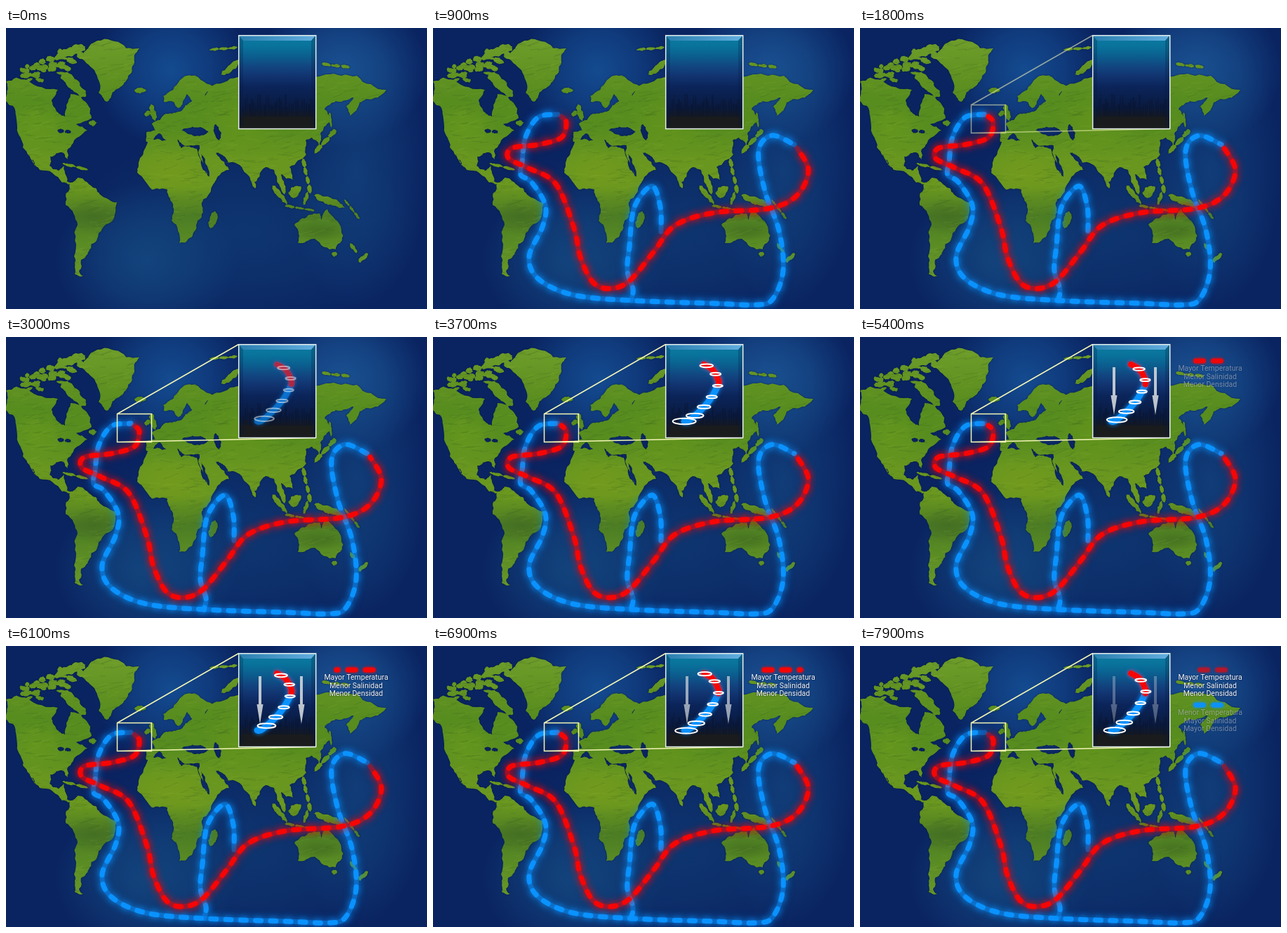
These frames come from a looping animation (600x400 px, 8 s). An HTML page with a canvas:

```html
<!DOCTYPE html>
<html lang="es">
<head>
<meta charset="utf-8">
<style>
html, body { margin: 0; width: 100%; height: 100%; overflow: hidden; background: #0a2260; }
canvas { display: block; }
</style>
</head>
<body>
<canvas id="stage" width="600" height="400"></canvas>
<script>
const W = 600, H = 400;
const RED = '#f60505', BLUE = '#0a92ff';
const ctx = document.getElementById('stage').getContext('2d');

let seed = 7;
const rand = () => (seed = seed * 16807 % 2147483647) / 2147483647;
const points = s => s.trim().split(/\s+/).map(p => p.split(',').map(Number));

function layer() {
  const c = document.createElement('canvas');
  c.width = W;
  c.height = H;
  return c.getContext('2d');
}

// Soft elliptical spot
function spot(g, x, y, rx, ry, rgb, alpha) {
  g.save();
  g.translate(x, y);
  g.scale(rx, ry);
  const fill = g.createRadialGradient(0, 0, 0, 0, 0, 1);
  fill.addColorStop(0, `rgba(${rgb},${alpha})`);
  fill.addColorStop(.5, `rgba(${rgb},${alpha * .6})`);
  fill.addColorStop(1, `rgba(${rgb},0)`);
  g.fillStyle = fill;
  g.fillRect(-1, -1, 2, 2);
  g.restore();
}

function gradient(g, y0, y1, colors) {
  const fill = g.createLinearGradient(0, y0, 0, y1);
  colors.forEach((color, i) => fill.addColorStop(i / (colors.length - 1), color));
  return fill;
}

const land = layer();

// Ragged edge by repeated midpoint displacement
function edge([x0, y0], [x1, y1], depth) {
  if (!depth) return land.lineTo(x1, y1);
  const k = (rand() - .5) * .3;
  const mid = [(x0 + x1) / 2 - (y1 - y0) * k, (y0 + y1) / 2 + (x1 - x0) * k];
  edge([x0, y0], mid, depth - 1);
  edge(mid, [x1, y1], depth - 1);
}

function coast(pts) {
  land.beginPath();
  land.moveTo(...pts[0]);
  pts.forEach((p, i) => edge(p, pts[(i + 1) % pts.length], 3));
  land.fill();
}

// A row of n ragged islands between two points
function isles(x0, y0, x1, y1, width, n = 1) {
  const dx = (x1 - x0) / n, dy = (y1 - y0) / n, len = Math.hypot(dx, dy);
  for (let i = 0; i < n; i++) {
    const ring = Array.from({ length: 8 }, (_, j) => {
      const r = .42 + rand() * .16, a = j * Math.PI / 4;
      const u = r * Math.cos(a), v = r * Math.sin(a) * width / len;
      return [x0 + dx * (i + .5 + u) - dy * v, y0 + dy * (i + .5 + u) + dx * v];
    });
    coast(ring);
  }
}

function drawLand() {
  land.fillStyle = gradient(land, 20, 350,
    ['#6d9c2a', '#629322', '#578c1f', '#578c1f', '#68961f', '#6a971f', '#4c7c24', '#5a8c24', '#669628']);
  // North America
  coast(points(`0,76 30,74 74,88 65,104 70,114 84,126 92,94 112,104 122,128 100,137 116,146 97,160
    87,176 88,187 82,178 63,183 62,196 74,203 82,195 87,218 97,221 80,220 48,202 32,178 41,196
    24,170 16,142 10,111 0,104`));
  // Greenland
  coast(points('103,40 118,27 155,19 190,29 182,52 172,74 156,88 144,105 132,92 126,60'));
  // South America
  coast(points(`92,220 102,213 128,228 134,237 158,248 150,276 130,300 118,318 107,330 104,346
    110,353 98,350 97,325 102,280 85,252`));
  // Africa
  coast(points(`202,162 230,160 250,171 272,172 284,204 290,212 301,210 281,244 281,262 270,288
    256,305 247,306 236,274 238,255 230,230 208,230 187,206 191,185`));
  // Eurasia
  coast(points(`200,162 200,148 213,146 208,136 228,122 250,118 264,105 290,84 330,70 380,50 456,66
    500,68 542,88 524,100 504,106 490,125 485,112 500,97 470,104 454,116 462,134 448,150 446,168
    436,156 427,160 428,180 404,198 409,216 392,208 397,237 386,218 382,202 370,198 351,223 336,198
    308,188 318,202 292,217 275,180 276,167 252,166 244,158 247,168 228,147 236,160 232,166
    219,150 206,162`));
  // Scandinavia
  coast(points('225,105 224,97 248,74 264,68 300,84 284,94 270,104 264,103 258,94 252,106 245,114 240,106'));
  // Australia
  coast(points('411,280 430,267 447,264 450,273 458,258 478,288 479,302 470,315 440,300 416,306'));

  // Arctic archipelago
  for (let i = 0; i < 38; i++) {
    const u = rand(), x = 18 + 84 * u, y = 72 - 36 * u + (rand() - .5) * 30;
    isles(x, y, x + 6 + rand() * 9, y + (rand() - .5) * 12, 4 + rand() * 5);
  }
  isles(66, 44, 116, 25, 15);
  isles(78, 62, 115, 99, 17);
  // Atlantic
  isles(118, 136, 129, 135, 8);
  isles(183, 89, 199, 89, 8);
  isles(206, 108, 213, 132, 10);
  isles(198, 125, 205, 119, 7);
  isles(80, 193, 118, 202, 4, 2);
  // Polar seas
  isles(304, 68, 334, 46, 9);
  isles(290, 31, 330, 28, 4, 3);
  isles(450, 51, 490, 56, 5, 3);
  // Indian Ocean
  isles(291, 287, 299, 260, 10);
  isles(353, 219, 355, 228, 5);
  // Eastern Asia and Oceania
  isles(461, 119, 464, 142, 4);
  isles(440, 178, 470, 144, 7, 3);
  isles(423, 186, 434, 235, 6, 4);
  isles(378, 222, 400, 252, 8);
  isles(398, 253, 440, 260, 4, 3);
  isles(404, 240, 420, 226, 15);
  isles(424, 252, 430, 234, 6);
  isles(438, 238, 484, 256, 11);
  isles(482, 244, 504, 272, 4, 3);
  isles(464, 322, 472, 322, 7);
  isles(490, 306, 500, 320, 6);
  isles(502, 334, 516, 320, 6);

  // Inland seas
  land.globalCompositeOperation = 'destination-out';
  isles(253, 146, 288, 148, 13);
  isles(299, 138, 304, 161, 9);
  isles(299, 177, 316, 191, 6);
  isles(278, 178, 290, 213, 4);
  isles(73, 146, 93, 148, 6, 2);

  // Relief
  land.globalCompositeOperation = 'source-atop';
  spot(land, 235, 205, 60, 34, '126,160,26', .4);
  spot(land, 125, 268, 46, 26, '60,98,34', .5);
  spot(land, 45, 140, 50, 34, '112,160,28', .5);
  spot(land, 335, 135, 60, 46, '110,156,24', .45);
  spot(land, 445, 290, 40, 14, '62,104,30', .6);
  land.lineWidth = 1.5;
  for (let i = 0; i < 1800; i++) {
    const x = rand() * W, y = rand() * 360, len = 5 + rand() * 16;
    land.strokeStyle = rand() < .6 ? 'rgba(35,70,18,.12)' : 'rgba(150,190,50,.1)';
    land.beginPath();
    land.moveTo(x, y);
    land.lineTo(x + len, y - len * (rand() - .3) * .6);
    land.stroke();
  }
}

function drawInset(g) {
  g.fillStyle = gradient(g, 11, 143,
    ['#0c7ba0', '#09739c', '#0b5e8f', '#124580', '#11326e', '#0b2459', '#0a1f4c', '#0b1a3e', '#181b20', '#1d1e1e']);
  g.fillRect(332, 11, 109, 132);
  g.fillStyle = 'rgba(6,12,30,.25)';
  for (let x = 337; x < 437; x += 3) {
    const top = 94 + rand() * 20;
    g.fillRect(x, top, 1 + rand() * 2, 127 - top);
  }
  g.fillStyle = '#191b1d';
  g.fillRect(332, 126, 109, 17);
  const shine = g.createLinearGradient(332, 0, 441, 0);
  shine.addColorStop(0, '#2a7fb0');
  shine.addColorStop(1, '#62aee0');
  g.fillStyle = shine;
  g.fill(new Path2D('M332,11H441L435,18H338Z'));
  g.fillStyle = 'rgba(5,25,60,.25)';
  g.fill(new Path2D('M332,11L338,18V137L332,143Z M441,11L435,18V137L441,143Z'));
  g.strokeStyle = '#e6f0ee';
  g.lineWidth = 1.5;
  g.strokeRect(331.7, 10.7, 110, 132.8);
}

const sea = layer();
sea.fillStyle = '#0a2461';
sea.fillRect(0, 0, W, H);
spot(sea, 235, 60, 110, 110, '22,84,155', .8);
spot(sea, 480, 60, 120, 110, '32,98,165', .75);
spot(sea, 200, 330, 130, 110, '22,78,134', .75);
spot(sea, 340, 290, 250, 140, '18,68,124', .55);
spot(sea, 500, 200, 100, 200, '20,72,130', .65);
drawLand();
sea.shadowColor = 'rgba(4,20,50,.7)';
sea.shadowBlur = 2;
sea.drawImage(land.canvas, 0, 0);

const inset = layer();
drawInset(inset);

// Smooth curve through points, as path data
function smooth(s) {
  const p = points(s), at = i => p[Math.max(0, Math.min(p.length - 1, i))];
  let d = 'M' + p[0];
  for (let i = 0; i < p.length - 1; i++) {
    const [a, b, c, e] = [at(i - 1), at(i), at(i + 1), at(i + 2)];
    const c1 = b.map((v, k) => v + (c[k] - a[k]) / 6);
    const c2 = c.map((v, k) => v - (e[k] - b[k]) / 6);
    d += `C${c1} ${c2} ${c}`;
  }
  return d;
}

const warm = new Path2D(smooth(`519,171 535,203 518,239 478,257 400,263 345,281 315,318 280,360
  252,371 228,362 210,326 201,285 175,222 135,199 108,186 112,171 150,166 183,156 190,135 183,126`));
const cold = new Path2D(smooth(`178,123 150,127 132,155 127,190 125,209 140,219 160,252 156,283
  137,325 150,357 200,380 285,388 400,392 460,394 484,386 499,345 493,288 473,232 464,175 483,153
  515,166`));
const branch = new Path2D(smooth('282,388 285,372 277,345 280,310 287,255 312,225 324,255 325,290'));

const plumeData = smooth('386,39 398,46 406,60 406,69 391,94 366,118 358,120');
const plume = new Path2D(plumeData);
const plumeLine = document.createElementNS('http://www.w3.org/2000/svg', 'path');
plumeLine.setAttribute('d', plumeData);
const plumeLength = plumeLine.getTotalLength();

// 0 before the start, 1 after the end, a straight ramp between
const ramp = (t, start, end) => Math.max(0, Math.min(1, (t - start) / (end - start)));

function fade(alpha, draw) {
  if (alpha <= 0) return;
  ctx.save();
  ctx.globalAlpha = alpha;
  draw();
  ctx.restore();
}

function glowStroke(path, color, width, dash, offset = 0, blur = 10) {
  ctx.strokeStyle = ctx.shadowColor = color;
  ctx.shadowBlur = blur;
  ctx.lineWidth = width;
  ctx.lineCap = ctx.lineJoin = 'round';
  ctx.setLineDash(dash);
  ctx.lineDashOffset = offset;
  ctx.stroke(path);
}

function route(path, color, t) {
  const alpha = ctx.globalAlpha;
  ctx.globalAlpha = alpha * .4;
  glowStroke(path, color, 7, [], 0, 13);
  ctx.globalAlpha = alpha;
  glowStroke(path, color, 7, [8, 13.2], -12.4 * t);
}

function drawPlume(t) {
  glowStroke(plume, BLUE, 9, [], 0, 6);
  glowStroke(plume, RED, 8, [38, 999], 0, 5);
  ctx.setLineDash([]);
  ctx.shadowBlur = 0;
  ctx.strokeStyle = '#fff';
  ctx.lineWidth = 2;
  for (let s = (11 + 16 * (t - 3) + 180) % 18; s < plumeLength; s += 18) {
    const { x, y } = plumeLine.getPointAtLength(s);
    const rx = 7 + 7 * ((s - 40) / 62) ** 2;
    ctx.beginPath();
    ctx.ellipse(x, y, rx, rx * .26, 0, 0, 7);
    ctx.stroke();
  }
}

function drawArrow(x) {
  ctx.fillStyle = '#ccd2d8';
  ctx.fill(new Path2D(`M${x - 2},43h4v40h2.5l-4.5,28l-4.5,-28h2.5z`));
}

function drawText(lines, y) {
  ctx.font = '10.5px Roboto, sans-serif';
  ctx.textAlign = 'center';
  ctx.fillStyle = '#f4f6fa';
  ctx.shadowColor = 'rgba(0,10,40,.8)';
  ctx.shadowBlur = 2;
  lines.forEach((line, i) => ctx.fillText(line, 499, y + i * 11.2));
}

// Legend entry: running dashes, then the text fading in behind them
function legend(t, start, y, color, lines) {
  fade(ramp(t, start, start + .8) * (1 - .5 * ramp(t, start + 2.5, start + 3.2)), () =>
    glowStroke(new Path2D(`M471,${y}H524`), color, 7, [11, 14], -12.4 * (t - start) + 1.2, 4));
  fade(ramp(t, start + .3, start + 1.2), () => drawText(lines, y + 14.3));
}

function drawFrame(t) {
  ctx.drawImage(sea.canvas, 0, 0);

  fade(ramp(t, 0, .9), () => {
    route(cold, BLUE, t);
    route(branch, BLUE, t);
    route(warm, RED, t);
  });

  fade(ramp(t, 1, 2.4), () => {
    ctx.strokeStyle = '#f3f5b4';
    ctx.lineWidth = 1.5;
    ctx.stroke(new Path2D('M158.5,109.5H207.5V149.5H158.5ZL331.5,10.5M158.5,149.5L441,143.5'));
  });

  ctx.drawImage(inset.canvas, 0, 0);
  fade(ramp(t, 2.7, 3.3), () => drawPlume(t));
  fade(.92 * ramp(t, 3.9, 5.2) * (1 - .6 * ramp(t, 6.4, 7.9)), () => {
    drawArrow(362);
    drawArrow(421);
  });

  legend(t, 4.7, 34, RED, ['Mayor Temperatura', 'Menor Salinidad', 'Menor Densidad']);
  legend(t, 7.2, 84, BLUE, ['Menor Temperatura', 'Mayor Salinidad', 'Mayor Densidad']);
}

function tick() {
  drawFrame(Math.floor(performance.now() % 8000 / 100) / 10);
  requestAnimationFrame(tick);
}
tick();
</script>
</body>
</html>
```
